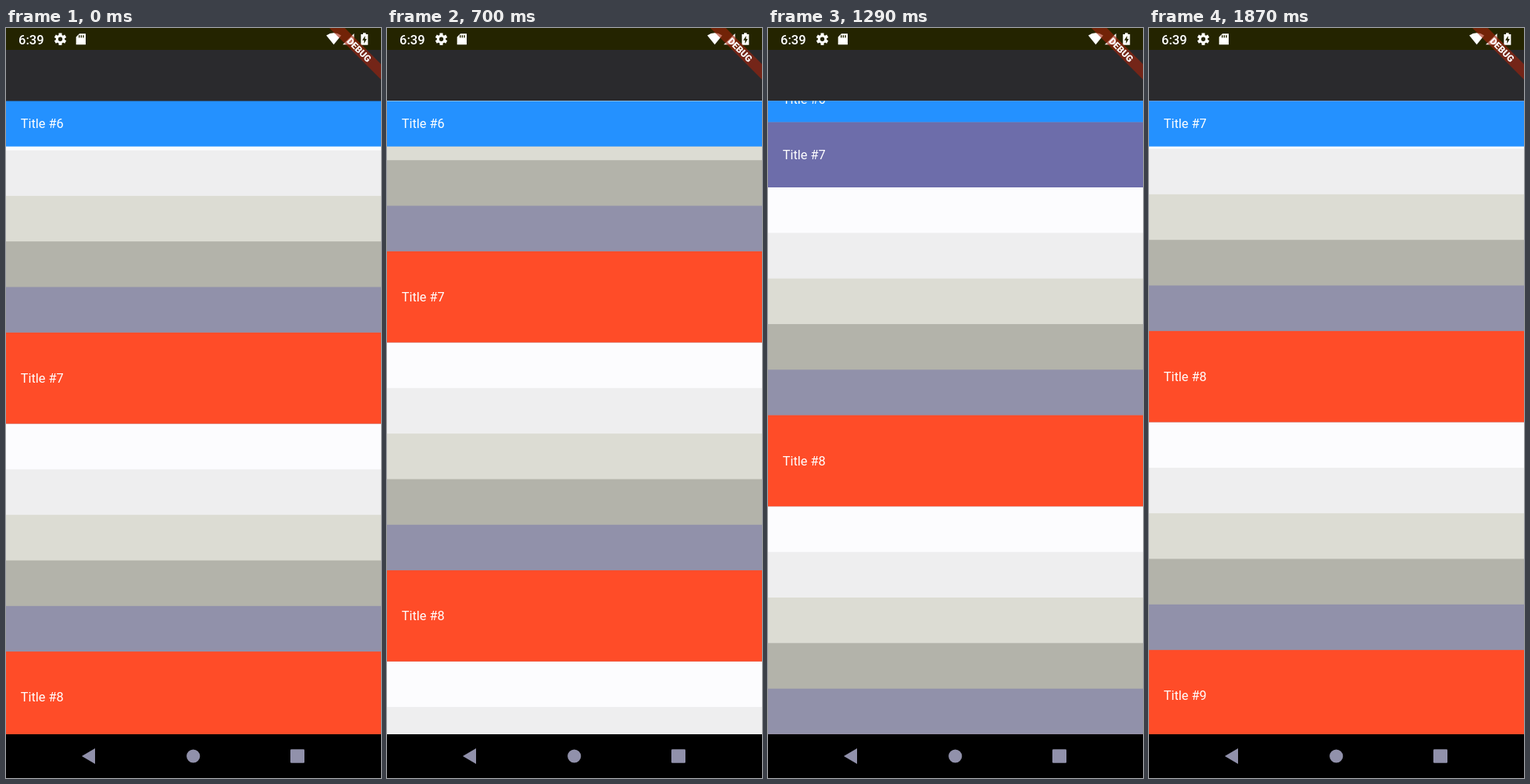
An HTML page with a canvas that plays this animation: 480 px wide and 960 px high, repeating every 2.4 s.

```html
<!DOCTYPE html>
<html lang="en">
<head>
<meta charset="utf-8">
<title>Sticky headers</title>
<style>
  html, body { margin: 0; width: 480px; height: 960px; overflow: hidden; background: #000; }
  canvas { display: block; }
</style>
</head>
<body>
<canvas id="stage" width="480" height="960"></canvas>
<script>
const ctx = document.getElementById('stage').getContext('2d');
const LOOP = 2400;
const WIDTH = 480, LIST_TOP = 93.33, LIST_BOTTOM = 904;
const ROW = 58.33, HEADER_MAX = ROW * 2, ROWS_HEIGHT = ROW * 5;
const SECTION = HEADER_MAX + ROWS_HEIGHT;
const STATUS_COLOR = '#242400', NAV_COLOR = '#9191ab';
const ROW_COLORS = ['#fcfcfe', '#eeeeef', '#dcdcd3', '#b3b3aa', '#9191aa'];

// Header tint by expansion: [amount, r, g, b]
const TINTS = [
  [0, 36, 145, 255], [0.09, 36, 146, 230], [0.43, 109, 109, 170],
  [0.946, 219, 75, 76], [1, 255, 76, 40]
];

// Scroll keys: [time, distance, speed]
const SCROLL = [
  [290, 2, 0.06], [500, 31.5, 0.3], [700, 104, 0.35], [1000, 205, 0.335],
  [1290, 302.5, 0.315], [1450, 350, 0.285], [1870, 410.3, 0]
];

const REFRESH_GAPS = [
  40, 40, 40, 40, 50, 120, 40, 40, 50, 40, 40, 40, 40, 40, 50, 40,
  50, 50, 50, 50, 50, 40, 40, 40, 40, 40, 40, 50, 40, 50, 80, 120
];
const refreshTimes = [290];
for (const gap of REFRESH_GAPS) refreshTimes.push(refreshTimes[refreshTimes.length - 1] + gap);

const clamp = (v, lo, hi) => Math.min(hi, Math.max(lo, v));

function segment(keys, x) {
  let i = 0;
  while (i < keys.length - 2 && x > keys[i + 1][0]) i++;
  return [keys[i], keys[i + 1]];
}

function scrollAt(time) {
  const shown = refreshTimes.filter(t => t <= time).pop();
  if (shown === undefined) return 0;
  const [[t0, s0, v0], [t1, s1, v1]] = segment(SCROLL, shown);
  const d = t1 - t0, u = (shown - t0) / d, w = 1 - u;
  return s0 * w * w * (1 + 2 * u) + s1 * u * u * (3 - 2 * u) + d * u * w * (v0 * w - v1 * u);
}

function tint(amount) {
  const [a, b] = segment(TINTS, amount);
  const u = (amount - a[0]) / (b[0] - a[0]);
  const rgb = [1, 2, 3].map(i => Math.round(a[i] + (b[i] - a[i]) * u));
  return `rgb(${rgb})`;
}

function rect(x, y, w, h, color) {
  ctx.fillStyle = color;
  ctx.fillRect(x, y, w, h);
}

function poly(points, color) {
  ctx.fillStyle = color;
  ctx.beginPath();
  points.forEach(([x, y]) => ctx.lineTo(x, y));
  ctx.closePath();
  ctx.fill();
}

function disc(x, y, r, color) {
  ctx.fillStyle = color;
  ctx.beginPath();
  ctx.arc(x, y, r, 0, Math.PI * 2);
  ctx.fill();
}

function text(str, x, y, font, align = 'left') {
  ctx.font = font + ' Roboto, sans-serif';
  ctx.textAlign = align;
  ctx.fillStyle = '#fff';
  ctx.fillText(str, x, y);
}

// A header shrinks as its lower edge nears the top, trailing the scroll slightly.
function headerAt(index, scroll) {
  const bottom = 506.5 - scroll + (index - 7) * SECTION;
  const room = Math.max(0, bottom - LIST_TOP);
  const height = clamp(Math.sqrt(ROW * (room * 1.04 + 4)), ROW, HEADER_MAX);
  return { top: bottom - height, height };
}

function drawSection(index, scroll) {
  const { top, height } = headerAt(index, scroll);
  const nextTop = headerAt(index + 1, scroll).top;
  ROW_COLORS.forEach((color, i) => {
    const y = nextTop - ROWS_HEIGHT + i * ROW;
    if (y < LIST_BOTTOM) rect(0, y, WIDTH, LIST_BOTTOM - y, color);
  });
  const y = Math.min(Math.max(top, LIST_TOP), nextTop - height);
  rect(0, y, WIDTH, height, tint(height / ROW - 1));
  text('Title #' + index, 18.67, y + height / 2 + 5.6, '16.33px');
}

function drawList(scroll) {
  ctx.save();
  ctx.beginPath();
  ctx.rect(0, LIST_TOP, WIDTH, LIST_BOTTOM - LIST_TOP);
  ctx.clip();
  for (let i = 6; i <= 9; i++) drawSection(i, scroll);
  ctx.restore();
}

function drawGear(x, y) {
  ctx.save();
  ctx.translate(x, y);
  for (let i = 0; i < 6; i++) {
    rect(-2, -7.7, 4, 4, '#fff');
    ctx.rotate(Math.PI / 3);
  }
  disc(0, 0, 5.7, '#fff');
  disc(0, 0, 2.7, STATUS_COLOR);
  ctx.restore();
}

function drawStatusBar() {
  rect(0, 0, WIDTH, 28, STATUS_COLOR);
  text('6:39', 16, 20.5, '500 16.5px');
  drawGear(69.5, 14.2);

  poly([[94, 7.3], [102, 7.3], [102, 21.3], [89.7, 21.3], [89.7, 11.5]], '#fff');
  for (const x of [93, 95.7, 98.4]) rect(x, 9.2, 1.4, 3.2, STATUS_COLOR);

  ctx.fillStyle = '#fff';
  ctx.beginPath();
  ctx.moveTo(419.5, 21.3);
  ctx.lineTo(410, 9.6);
  ctx.quadraticCurveTo(419.5, 3, 429, 9.6);
  ctx.fill();

  poly([[431, 21.3], [445.5, 21.3], [445.5, 7]], '#fff');

  rect(457, 6.3, 3.6, 3, '#fff');
  rect(454.3, 8, 9, 13.7, '#fff');
  poly([[459.6, 10], [456, 15.8], [458.3, 15.8], [458.3, 20], [461.8, 14], [459.6, 14]], STATUS_COLOR);
}

function drawBanner() {
  ctx.save();
  ctx.translate(WIDTH, 0);
  ctx.rotate(Math.PI / 4);
  rect(-46.7, 32.7, 93.4, 14, 'rgba(160, 36, 12, 0.63)');
  text('DEBUG', 0, 43.8, '900 11.9px', 'center');
  ctx.restore();
}

function drawNavBar() {
  rect(0, LIST_BOTTOM, WIDTH, 960 - LIST_BOTTOM, '#000');
  poly([[97, 932], [114, 922], [114, 942]], NAV_COLOR);
  disc(239.7, 932, 8.6, NAV_COLOR);
  ctx.fillStyle = NAV_COLOR;
  ctx.beginPath();
  ctx.roundRect(364, 923.2, 18, 17.6, 1.2);
  ctx.fill();
}

function draw(time) {
  rect(0, 0, WIDTH, LIST_TOP + 1, '#2a2a2d');
  drawList(scrollAt(time));
  drawStatusBar();
  drawBanner();
  drawNavBar();
}

function tick() {
  draw(performance.now() % LOOP);
  requestAnimationFrame(tick);
}
tick();
</script>
</body>
</html>
```
